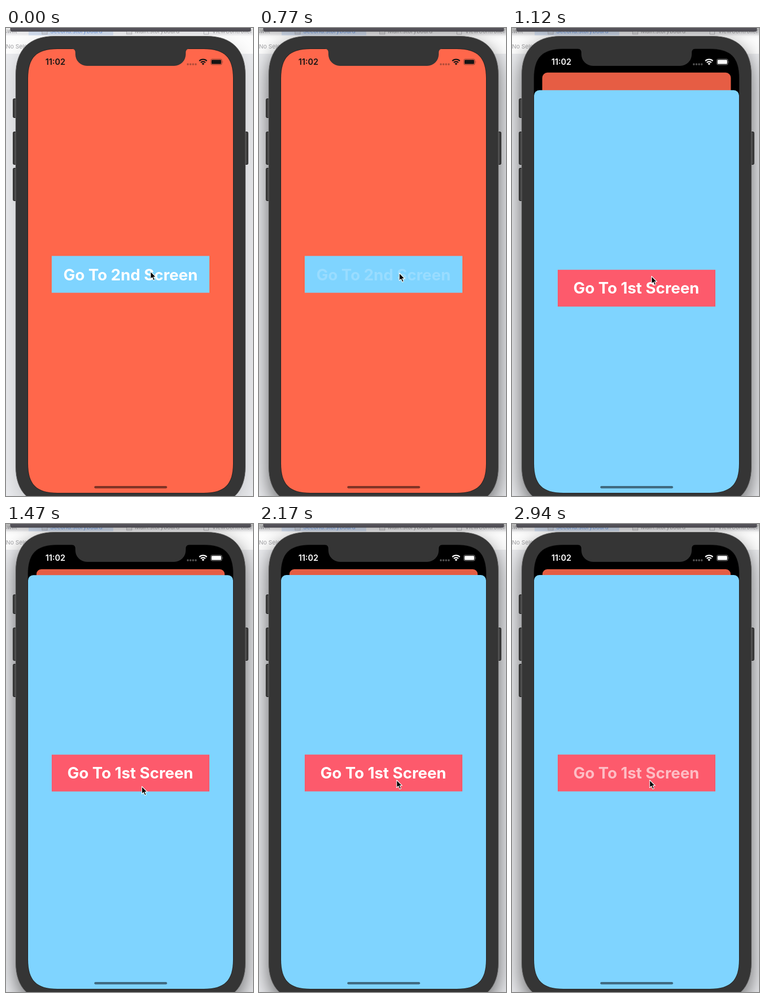
Write an HTML page that moves like this. It is 470 by 890 pixels and loops after 3.01 s.

```html
<!DOCTYPE html>
<html lang="en">
<head>
<meta charset="utf-8">
<title>Screen transition</title>
<style>
  html, body { margin: 0; width: 100%; height: 100%; overflow: hidden; background: #e9eaed; }
  svg { display: block; width: 470px; height: 890px; font-family: Inter, "Liberation Sans", sans-serif; }
  .tab { font-size: 11px; fill: #a3a3a6; }
  .icon { fill: none; stroke: #b4b4b8; }
  .label { font-size: 29.7px; font-weight: 700; fill: #fff; text-anchor: middle; }
  .key { fill: #424242; stroke: #161616; }
</style>
</head>
<body>
<svg viewBox="0 0 470 890">
  <defs>
    <clipPath id="screenClip"><path id="screenShape"/></clipPath>
    <filter id="blur" filterUnits="userSpaceOnUse" x="-80" y="-80" width="630" height="1080">
      <feGaussianBlur stdDeviation="19"/>
    </filter>
    <filter id="softBlur" filterUnits="userSpaceOnUse" x="-30" y="-30" width="530" height="80">
      <feGaussianBlur stdDeviation="6"/>
    </filter>
  </defs>

  <!-- Editor window behind the phone -->
  <rect width="470" height="890" fill="#ebecef"/>
  <rect width="470" height="49" fill="#fdfdfd"/>
  <rect y="6" width="470" height="8" fill="#f1f1f3"/>
  <rect x="43" y="6" width="161" height="8" fill="#d5e0f1"/>
  <g class="tab">
    <text x="-4" y="10">swift</text>
    <text x="84" y="10" fill="#78a0e2">Second.storyboard</text>
    <text x="245" y="10">Main.storyboard</text>
    <text x="392" y="10">ViewController</text>
    <text x="0" y="39">No Selection</text>
  </g>
  <path class="icon" d="M68.5 3v9h10v-9M68.5 9.5h10M229.5 3v9h10v-9M229.5 9.5h10M376.5 3v9h9v-9"/>
  <g id="shadows">
    <rect x="-10" y="-20" width="490" height="28" fill-opacity=".55" filter="url(#softBlur)"/>
    <g filter="url(#blur)"><path id="shadow" transform="translate(0 14)"/></g>
  </g>
  <path d="M8 0H466V4q0 2.5-3 2.5H11q-3 0-3-2.5Z" fill="#535158"/>
  <path d="M10 6.2H464" stroke="#38363b" stroke-width=".8"/>

  <!-- Phone -->
  <g class="key">
    <rect x="13.5" y="134.500" width="9" height="36" rx="2"/>
    <rect x="13.5" y="197.500" width="9" height="62" rx="2"/>
    <rect x="13.5" y="266.500" width="9" height="62" rx="2"/>
    <rect x="451.5" y="197.500" width="9" height="62" rx="2"/>
  </g>
  <path id="body" fill="#353535" stroke="#666" stroke-width="1"/>
  <path id="bezel" fill="#000" stroke="#1c1c1c" stroke-width="1.5"/>

  <g clip-path="url(#screenClip)">
    <rect x="42" y="40" width="390" height="844" fill="#000"/>
    <g id="card">
      <rect id="cardFace" x="42" y="40" width="390" height="860" fill="#ff674b"/>
      <rect x="87" y="433.500" width="300" height="70" fill="#7fd4ff"/>
      <text id="goSecond" class="label" x="237" y="479.500">Go To 2nd Screen</text>
      <rect id="dim" x="42" y="40" width="390" height="860"/>
    </g>
    <g id="sheet">
      <rect x="42" width="390" height="860" rx="10" fill="#7fd4ff"/>
      <rect x="87" y="341.500" width="300" height="70" fill="#fd5a6c"/>
      <text id="goFirst" class="label" x="236.500" y="387">Go To 1st Screen</text>
    </g>
    <rect x="168" y="871" width="138.500" height="4.500" rx="2.200" fill-opacity=".5"/>
  </g>
  <path d="M125 39Q132 40 132 47V50a22 22 0 0 0 22 22H320a22 22 0 0 0 22-22V47Q342 40 349 39Z" fill="#353535"/>

  <!-- Status bar, tinted through currentColor -->
  <g id="status" fill="currentColor">
    <text x="75" y="70.300" font-size="15.500" font-weight="600">11:02</text>
    <g opacity=".33">
      <circle cx="346" cy="69" r="1.900"/><circle cx="351" cy="69" r="1.900"/>
      <circle cx="356" cy="69" r="1.900"/><circle cx="361" cy="69" r="1.900"/>
    </g>
    <g fill="none" stroke="currentColor" stroke-width="2.200">
      <path d="M367.800 62.700a10.200 10.200 0 0 1 14.400 0M370.600 65.700a6.200 6.200 0 0 1 8.800 0"/>
    </g>
    <path d="M375 70.500l-2.500-2.700a3.600 3.600 0 0 1 5 0Z"/>
    <rect x="389.500" y="59" width="21.500" height="11" rx="3" fill="none" stroke="currentColor" stroke-opacity=".45"/>
    <rect x="391" y="60.500" width="18.500" height="8" rx="1.600"/>
    <path d="M412.300 62.800q1.400 1.700 0 3.600Z" opacity=".5"/>
  </g>

  <path id="cursor" d="M0 0V14.500L3.300 11.400L5.700 17L8.200 15.900L5.900 10.500H10.300Z" fill="#000" stroke="#fff" stroke-width="1.100" stroke-linejoin="round"/>
</svg>

<script>
const LOOP = 3010, STEP = 70;
const $ = id => document.getElementById(id);
const mix = (a, b, p) => a + (b - a) * p;
const ramp = (t, from, to) => Math.min(1, Math.max(0, (t - from) / (to - from)));
const smooth = p => p * p * (3 - 2 * p);

// Rounded box with continuous corners: e = corner extent, h = handle distance from the corner.
function squircle(l, t, r, b, e, h) {
  return `M${l + e} ${t}H${r - e}C${r - h} ${t} ${r} ${t + h} ${r} ${t + e}` +
    `V${b - e}C${r} ${b - h} ${r - h} ${b} ${r - e} ${b}` +
    `H${l + e}C${l + h} ${b} ${l} ${b - h} ${l} ${b - e}` +
    `V${t + e}C${l} ${t + h} ${l + h} ${t} ${l + e} ${t}Z`;
}

for (const id of ['screenShape', 'bezel'])
  $(id).setAttribute('d', squircle(42, 40, 432, 884, 56, 16));
for (const id of ['body', 'shadow'])
  $(id).setAttribute('d', squircle(18.5, 15.5, 455.5, 908, 74, 26));

// Pointer stops: time, x, y
const stops = [
  [0, 275, 463], [560, 267, 466], [770, 267, 466], [910, 267, 469],
  [1120, 265.5, 472], [1470, 258.5, 499], [2030, 262, 487], [LOOP, 262, 487]
];

function pointer(t) {
  const i = stops.findIndex(s => s[0] > t);
  const [t0, x0, y0] = stops[i - 1], [t1, x1, y1] = stops[i];
  const p = smooth(ramp(t, t0, t1));
  return [mix(x0, x1, p), mix(y0, y1, p)];
}

// Critically damped spring that presents the sheet
function presented(t) {
  const x = Math.max(0, t - 777) * 0.016;
  return 1 - (1 + x) * Math.exp(-x);
}

function draw(t) {
  const p = presented(t);

  // The phone window casts a deeper shadow once the click activates it.
  $('shadows').setAttribute('opacity', t > 665 ? 0.58 : 0.16);

  $('card').setAttribute('transform',
    `translate(237 ${40 + 46 * p}) scale(${mix(1, 0.918, p)}) translate(-237 -40)`);
  for (const id of ['cardFace', 'dim']) $(id).setAttribute('rx', mix(40, 10, p));
  $('dim').setAttribute('fill-opacity', 0.1 * p);
  $('sheet').setAttribute('transform', `translate(0 ${mix(890, 97, p)})`);

  $('goSecond').setAttribute('opacity', mix(1, 0.2, ramp(t, 660, 740)));
  $('goFirst').setAttribute('opacity', mix(1, 0.2, ramp(t, 2900, 2980)));

  const tint = Math.round(mix(20, 255, ramp(t, 790, 1130)));
  $('status').setAttribute('color', `rgb(${tint},${tint},${tint})`);
  $('cursor').setAttribute('transform', `translate(${pointer(t)})`);
}

const start = performance.now();
function tick() {
  const t = (performance.now() - start) % LOOP;
  draw(Math.floor(t / STEP) * STEP);
  requestAnimationFrame(tick);
}
tick();
</script>
</body>
</html>
```
